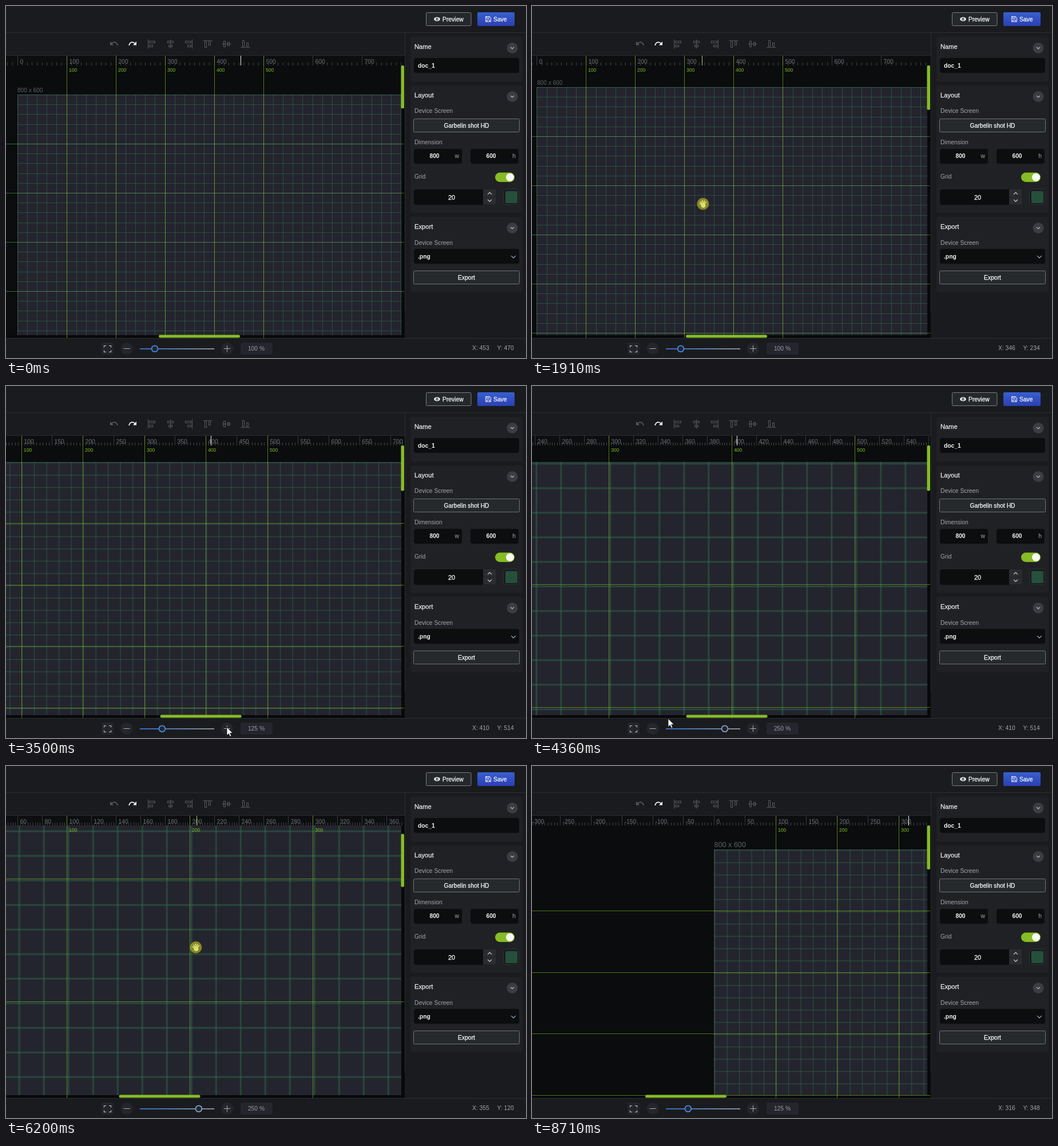
Recreate the animation shown at these times as an HTML page with a canvas. Size 909 px wide and 616 px high, loop 9.24 s.

```html
<!DOCTYPE html>
<html lang="en">
<head>
<meta charset="utf-8">
<title>Canvas editor</title>
<style>
html, body { margin: 0; width: 100%; height: 100%; overflow: hidden; background: #1a1b1e; }
canvas { display: block; }
</style>
</head>
<body>
<canvas id="stage" width="909" height="616"></canvas>
<script>
const ctx = document.getElementById('stage').getContext('2d');
const LOOP = 9240, LAG = 70, UNIT = 0.86;
const GREEN = '#86bc25', WHITE = '#f2f3f4', MUTED = '#a3a6aa';
const FONT = '"Liberation Sans", Arial, sans-serif';

// key points: [time, x, y]
const cursorPath = [
  [70, 409.6, 559.7], [450, 262, 430],
  [1230, 317.6, 356.7], [1300, 284, 354], [2320, 307, 342],
  [3150, 358.4, 575.6], [3400, 386, 597], [4000, 386, 597], [4360, 238, 582],
  [5250, 252.8, 391.5], [5700, 400, 340], [6150, 333, 314],
  [6900, 255, 563.4], [7160, 239.5, 575], [7500, 211, 592], [8420, 211, 592], [8640, 658.2, 520.6]
];
const panPath = [
  [1230, 20, 155.5], [1300, 14, 155.5], [2390, 5.5, 133.5],
  [5250, 5.5, 133.5], [6200, 408, -17], [6690, 405.5, 146.5]
];
const drags = [[1230, 2390], [5250, 6690]];
const outside = [[3150, 4450], [6900, 8460], [8640, LOOP]];

function along(path, t) {
  const i = path.findIndex(k => t < k[0]);
  const b = path[i < 0 ? path.length - 1 : i], a = i > 0 ? path[i - 1] : b;
  const u = a === b ? 0 : (t - a[0]) / (b[0] - a[0]), e = u * u * (3 - 2 * u);
  return { x: a[1] + (b[1] - a[1]) * e, y: a[2] + (b[2] - a[2]) * e };
}

const inside = (spans, t) => spans.find(s => t >= s[0] && t < s[1]);

// number of clicks made, the first at `from`, then one every `gap`
const clicks = (t, from, gap, max) => Math.max(0, Math.min(max, Math.floor((t - from) / gap) + 1));

function view(t) {
  const zoom = 1 + (clicks(t, 3430, 108, 6) - clicks(t, 7690, 138, 5)) * 0.25;
  const raw = along(panPath, t);
  const shift = t < 7600 ? -344 * (zoom - 1) : -87 - 343.2 * (zoom - 1.25);
  return { zoom, scale: zoom * UNIT, x: raw.x + shift, y: raw.y, raw };
}

function pointer(t) {
  const late = Math.max(70, t - LAG), out = inside(outside, late), drag = inside(drags, late);
  const seen = out ? out[0] : late, read = drag ? drag[0] : seen;
  const p = along(cursorPath, read), v = view(read);
  return {
    mark: along(cursorPath, seen).x,
    x: Math.round((p.x - v.x) / v.scale),
    y: Math.round((p.y - v.y) / v.scale)
  };
}

function rect(x, y, w, h, fill) { ctx.fillStyle = fill; ctx.fillRect(x, y, w, h); }

function box(x, y, w, h, r, fill, stroke) {
  ctx.beginPath();
  ctx.roundRect(x, y, w, h, r);
  ctx.fillStyle = fill;
  ctx.fill();
  if (stroke) { ctx.strokeStyle = stroke; ctx.lineWidth = 1; ctx.stroke(); }
}

function oval(x, y, rx, ry, fill) {
  ctx.beginPath();
  ctx.ellipse(x, y, rx, ry, 0, 0, 7);
  ctx.fillStyle = fill;
  ctx.fill();
}

const disc = (x, y, r, fill) => oval(x, y, r, r, fill);

function text(s, x, y, color, { size = 10.32, weight = '', align = 'left' } = {}) {
  ctx.font = `${weight === 'bold' ? 'bold' : ''} ${size}px ${FONT}`;
  ctx.textAlign = align;
  ctx.fillStyle = color;
  ctx.fillText(s, x, y);
  if (weight === 'medium') {
    ctx.strokeStyle = color;
    ctx.lineWidth = 0.3;
    ctx.strokeText(s, x, y);
  }
}

function line(color, width, ...runs) {
  ctx.strokeStyle = color;
  ctx.lineWidth = width;
  ctx.beginPath();
  for (const p of runs)
    for (let i = 0; i < p.length; i += 2) i ? ctx.lineTo(p[i], p[i + 1]) : ctx.moveTo(p[i], p[i + 1]);
  ctx.stroke();
}

function chevron(x, y, color, w = 3, h = 1.5) {
  line(color, 1.1, [x - w, y - h, x, y + h, x + w, y - h]);
}

function clip(x, y, w, h, draw) {
  ctx.save();
  ctx.beginPath();
  ctx.rect(x, y, w, h);
  ctx.clip();
  draw();
  ctx.restore();
}

function artboard(v) {
  const w = 800 * v.scale, h = 600 * v.scale, step = 20 * v.scale;
  const left = Math.floor(v.x), top = Math.floor(v.y), sharp = v.zoom === 1;
  text('800 x 600', v.x, v.y - 4.5, '#5d6165', { size: 10.1 * v.zoom });
  rect(left, top, w, h, '#24242e');
  const band = (size, alpha) => {
    const place = p => sharp ? Math.floor(p) : p + 0.92 * v.zoom - size / 2;
    ctx.fillStyle = `rgba(46,120,82,${alpha})`;
    for (let i = 0; i < 40; i++) ctx.fillRect(place(v.x + i * step), top, size, h);
    for (let i = 0; i < 30; i++) ctx.fillRect(left, place(v.y + i * step), w, size);
  };
  if (sharp) band(1, 0.5);
  else { band(1.6 * v.zoom, 0.2); band(0.8 * v.zoom, 0.3); }
  rect(left, top, w, 1, 'rgba(120,140,135,.25)');
  rect(left, top, 1, h, 'rgba(120,140,135,.25)');
}

function ruler(v) {
  rect(0, 87, 697, 17, '#0d0e10');
  const major = v.zoom < 1.25 ? 100 : v.zoom < 2 ? 50 : 20, minor = major / 10;
  const first = Math.floor(-v.x / v.scale / minor) - 10, last = Math.ceil((694 - v.x) / v.scale / minor);
  for (let i = first; i < last; i++) {
    const x = Math.floor(v.x + i * minor * v.scale), big = i % 10 === 0;
    rect(x, big ? 87 : 99, 1, big ? 17 : 5, big ? '#36393c' : '#404347');
    if (big) text(i * minor, x + 4.5, 100.8, '#6d7175');
  }
}

function guides(v) {
  const across = v.zoom === 1 ? 'rgba(96,165,85,.6)' : 'rgba(134,188,37,.6)';
  for (let i = 1; i <= 5; i++) {
    const d = i * 100 * v.scale, x = Math.floor(v.x + d), y = Math.floor(v.y + d - 0.4 * v.zoom);
    rect(x, 87, 1, 494, 'rgba(134,188,37,.62)');
    if (y > 104) rect(0, y, 696, 1, across);
    text(i * 100, x + 4, 114.5, GREEN, { size: 8.6 });
  }
}

function workspace(t, v, p) {
  rect(0, 87, 697, 494, '#0a0c0d');
  clip(0, 104, 691, 472, () => artboard(v));
  rect(691, 104, 6, 477, '#08090a');
  rect(0, 576, 697, 5, '#08090a');
  clip(0, 87, 694, 17, () => ruler(v));
  clip(0, 87, 696, 494, () => guides(v));
  rect(Math.round(p.mark), 87, 1, 17, inside(drags, t) ? '#a9c860' : '#eceeee');
  const bottom = 179.3 + 0.188 * (155.5 - v.y), top = Math.max(104, bottom - 93);
  box(690.5, top, 5.5, bottom - top, 2, GREEN);
  box(267 + 0.179 * (20 - v.raw.x), 575.5, 142, 5, 2.5, GREEN);
}

// left, centre, right, then the same three with the axes swapped
function alignIcons() {
  for (let i = 0; i < 6; i++) {
    const k = i % 3 - 1;
    ctx.save();
    ctx.translate(Math.round(254 + i * 32.7) + 0.5, 66.5);
    if (i > 2) ctx.transform(0, 1, 1, 0, 0, 0);
    line('#56595e', 1, [k * 6, -8, k * 6, 8]);
    for (const [y, len] of [[-5, 10], [2, 6]]) ctx.strokeRect(k * 4 - (k + 1) / 2 * len, y, len, 3);
    ctx.restore();
  }
}

function turnArrow(x, dir, color) {
  ctx.save();
  ctx.translate(x, 66);
  ctx.scale(dir, 1);
  ctx.strokeStyle = ctx.fillStyle = color;
  ctx.lineWidth = 1.7;
  ctx.beginPath();
  ctx.moveTo(-6, 3);
  ctx.bezierCurveTo(-4, -4, 1, -4, 5, 0);
  ctx.stroke();
  ctx.beginPath();
  ctx.moveTo(7, -4);
  ctx.lineTo(7, 2.5);
  ctx.lineTo(1, 2.5);
  ctx.fill();
  ctx.restore();
}

function header() {
  rect(0, 0, 909, 616, '#1a1b1e');
  rect(0, 46, 909, 1, '#2a2c2f');
  rect(0, 86, 697, 1, '#2a2c2f');
  rect(697, 47, 1, 488, '#2b2d30');
  box(734.5, 11.5, 78.5, 23, 2, '#25282b', '#7c7f83');
  oval(753.5, 23, 5.3, 3.4, WHITE);
  disc(753.5, 23, 2.3, '#25282b');
  disc(753.5, 23, 1.1, WHITE);
  text('Preview', 763, 26.7, WHITE, { weight: 'medium' });
  const blue = ctx.createLinearGradient(0, 11, 0, 35);
  blue.addColorStop(0, '#3760d0');
  blue.addColorStop(1, '#2b3fb2');
  box(824, 11, 65, 24, 2, blue);
  line(WHITE, 1, [838.5, 18.5, 845.5, 18.5, 847.5, 20.5, 847.5, 27.5, 838.5, 27.5, 838.5, 18]);
  ctx.strokeRect(840.5, 18.5, 4, 3);
  ctx.strokeRect(840.5, 24.5, 5, 3);
  text('Save', 852, 26.7, WHITE, { weight: 'medium' });
  turnArrow(189, -1, '#56595e');
  turnArrow(221, 1, '#f4f5f5');
  alignIcons();
}

function sidebar() {
  const field = (x, y, w) => box(x, y, w, 26, 4, '#0c0d0e');
  const label = (s, y) => text(s, 714, y, MUTED);
  const button = (s, y) => {
    box(712.5, y + 0.5, 185, 23, 2, '#26292c', '#707377');
    text(s, 805, y + 15.5, WHITE, { weight: 'medium', align: 'center' });
  };
  for (const [s, y, h] of [['Name', 54, 78], ['Layout', 139, 223], ['Export', 369, 132]]) {
    box(707, y, 196, h, 4, '#202124');
    text(s, 714, y + 20.5, '#e6e7e8', { size: 11.2, weight: 'medium' });
    disc(885, y + 19.5, 9.5, '#3b3d42');
    chevron(885, y + 19.5, '#b9bcc0');
  }
  field(713, 91, 184);
  text('doc_1', 720, 108, WHITE, { weight: 'bold' });
  label('Device Screen', 187);
  button('Garbelin shot HD', 197);
  label('Dimension', 242);
  for (const [x, n, u] of [[713, '800', 'w'], [812, '600', 'h']]) {
    field(x, 250, 84);
    text(n, x + 36, 266, WHITE, { weight: 'bold', align: 'center' });
    text(u, x + 79, 266, MUTED, { align: 'right' });
  }
  label('Grid', 302);
  box(855, 291.5, 34, 16.5, 8.2, GREEN);
  disc(881, 299.8, 7, '#f7f8f5');
  box(713, 321, 121, 27, [4, 0, 0, 4], '#0c0d0e');
  text('20', 779, 338.5, WHITE, { size: 11, weight: 'medium', align: 'center' });
  rect(834, 321, 22, 13, '#2a2c2f');
  rect(834, 335, 22, 12, '#2a2c2f');
  chevron(845.5, 328, '#d5d7d9', 3.5, -1.7);
  chevron(845.5, 340.5, '#d5d7d9', 3.5, 1.7);
  box(869.5, 320.5, 27, 27, 4, '#1a1b1e', '#303236');
  box(873, 324, 21, 21, 2, '#25503c');
  label('Device Screen', 417.5);
  field(713, 425, 184);
  text('.png', 720, 442, WHITE, { weight: 'bold' });
  chevron(887, 439, '#a8bbdf', 3.8, 1.9);
  button('Export', 463);
}

function footer(v, p) {
  rect(0, 581, 909, 35, '#1a1b1e');
  rect(0, 581, 909, 1, '#2c2e31');
  box(167, 589, 21, 21, 3, '#24252a');
  for (const sx of [-1, 1])
    for (const sy of [-1, 1]) {
      const x = 177.5 + sx * 6, y = 600 + sy * 5.5;
      line('#bfc2c6', 1.1, [x, y - sy * 3, x, y, x - sx * 3.5, y]);
    }
  for (const x of [211, 386.5]) {
    disc(x, 599.5, 10.5, '#25262b');
    line('#a9acb0', 1, [x - 5.5, 599.5, x + 5.5, 599.5]);
  }
  line('#a9acb0', 1, [386.5, 594, 386.5, 605]);
  const track = ctx.createLinearGradient(234, 0, 364, 0);
  track.addColorStop(0, '#3c82ea');
  track.addColorStop(0.25, '#4a88e0');
  track.addColorStop(1, '#a4a9b0');
  rect(234, 599.2, 130, 1.6, track);
  const knob = 260 + (v.zoom - 1) * 51.3;
  disc(knob, 599.8, 6.3, track);
  disc(knob, 599.8, 4.5, '#1f2734');
  box(410, 589, 56, 21, 3, '#24252e');
  text(Math.round(v.zoom * 100) + ' %', 437.5, 603, '#9a9da3', { align: 'center' });
  text('X: ' + p.x, 815, 602, MUTED);
  text('Y: ' + p.y, 858.5, 602, MUTED);
}

function hand(x, y) {
  ctx.save();
  ctx.translate(x, y);
  ctx.lineCap = 'round';
  for (const [color, grow] of [['#16171a', 1.4], ['#fff', 0]]) {
    for (let i = 0; i < 5; i++) {
      const a = (i - 2.4) * 0.42, len = 9 - 0.5 * Math.abs(i - 2.3) ** 1.5;
      line(color, 1.9 + grow, [0.5, 3, 0.5 + Math.sin(a) * len, 3 - Math.cos(a) * len]);
    }
    oval(0.5, 3, 4 + grow / 2, 3.8 + grow / 2, color);
  }
  ctx.restore();
}

function arrow(x, y) {
  const shape = [0, 0, 0, 14.5, 3.3, 11.4, 5.6, 16.5, 7.9, 15.5, 5.7, 10.5, 10.2, 10.5];
  ctx.beginPath();
  for (let i = 0; i < shape.length; i += 2) ctx.lineTo(x + shape[i], y + shape[i + 1]);
  ctx.closePath();
  ctx.fillStyle = '#fff';
  ctx.fill();
  ctx.strokeStyle = '#111';
  ctx.lineWidth = 0.8;
  ctx.stroke();
}

function cursor(t) {
  if (t < 70 || t >= 8690) return;
  const c = along(cursorPath, t);
  if (c.y < 574 && c.x < 691) hand(c.x, c.y); else arrow(c.x, c.y);
  if (inside(drags, t)) disc(c.x, c.y, 10.5, 'rgba(200,200,30,.6)');
}

function draw(t) {
  const v = view(t), p = pointer(t);
  header();
  workspace(t, v, p);
  sidebar();
  footer(v, p);
  cursor(t);
}

const start = performance.now();
function tick() {
  draw((performance.now() - start) % LOOP);
  requestAnimationFrame(tick);
}
tick();
</script>
</body>
</html>
```
